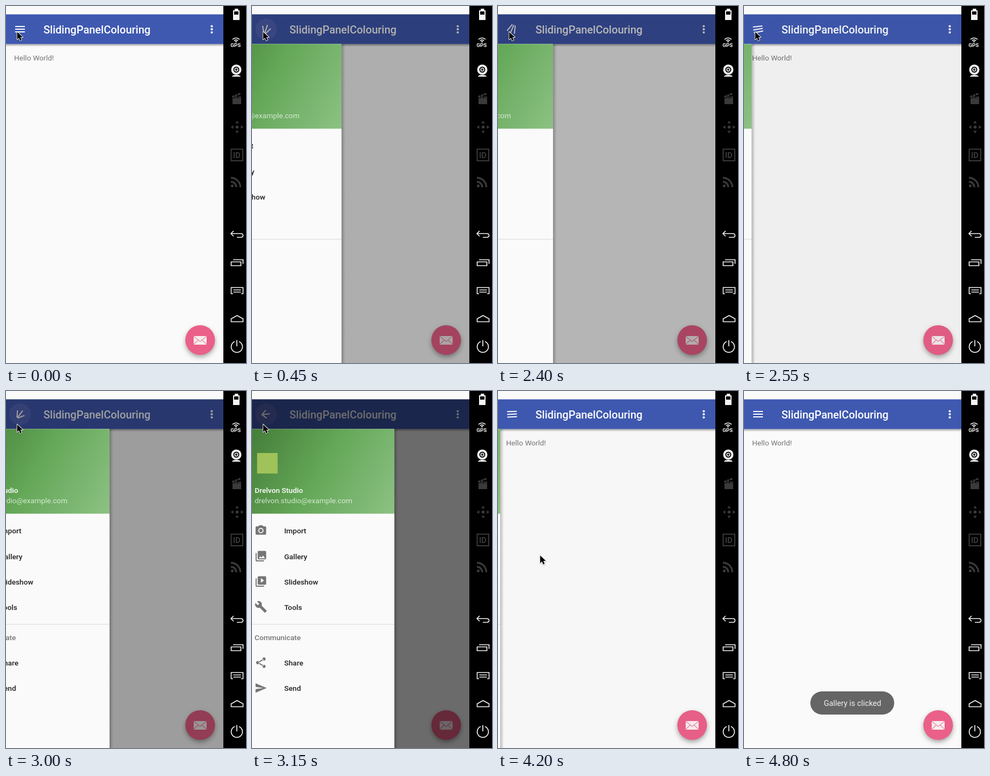
An HTML page with a canvas for the animation above (5250 ms loop, 445 by 662 pixels).

```html
<!DOCTYPE html>
<html lang="en">
<head>
<meta charset="utf-8">
<title>Navigation drawer</title>
<style>
  html, body { margin: 0; width: 100%; height: 100%; overflow: hidden; background: #fafafa; }
  canvas { display: block; width: 445px; height: 662px; }
</style>
</head>
<body>
<canvas id="stage"></canvas>
<script>
const W = 445, H = 662, APP_W = 403, BAR_TOP = 15.5, BAR_BOTTOM = 70.5, DRAWER_W = 274;
const LOOP = 5250, TICK = 150, SLIDE = 557, SCRIM_LAG = 21;
const FONT = 'Roboto, "Open Sans", sans-serif';

const canvas = document.getElementById('stage');
const ctx = canvas.getContext('2d');
const ratio = window.devicePixelRatio || 1;
canvas.width = W * ratio;
canvas.height = H * ratio;

// Drawer moves: [start time, 1 = open / 0 = close]
const MOVES = [[355, 1], [2300, 0], [2880, 1], [3880.4, 0]];
// Pointer stops: [time, x, y]
const POINTER = [[0, 20, 47], [2850, 20, 61], [3300, 49, 236], [3450, 62, 279], [3600, 77.5, 304]];
const POINTER_END = 4350, TOAST_START = 4350;

const ICONS = {
  camera: 'M9 2L7.17 4H4c-1.1 0-2 .9-2 2v12c0 1.1.9 2 2 2h16c1.1 0 2-.9 2-2V6c0-1.1-.9-2-2-2h-3.17L15 2H9z' +
    'm3 15a5 5 0 1 1 0-10 5 5 0 0 1 0 10zM12 8.8a3.2 3.2 0 1 0 0 6.4 3.2 3.2 0 0 0 0-6.4z',
  gallery: 'M22 16V4c0-1.1-.9-2-2-2H8c-1.1 0-2 .9-2 2v12c0 1.1.9 2 2 2h12c1.1 0 2-.9 2-2z' +
    'm-11-4l2.03 2.71L16 11l4 5H8l3-4zM2 6v14c0 1.1.9 2 2 2h14v-2H4V6H2z',
  slides: 'M4 6H2v14c0 1.1.9 2 2 2h14v-2H4V6zM20 2H8c-1.1 0-2 .9-2 2v12c0 1.1.9 2 2 2h12c1.1 0 2-.9 2-2V4' +
    'c0-1.1-.9-2-2-2zm-8 12.5v-9l6 4.5-6 4.5z',
  wrench: 'M22.7 19l-9.1-9.1c.9-2.3.4-5-1.5-6.9-2-2-5-2.4-7.4-1.3L9 6 6 9 1.6 4.7C.4 7.1.9 10.1 2.9 12.1' +
    'c1.9 1.9 4.6 2.4 6.9 1.5l9.1 9.1c.4.4 1 .4 1.4 0l2.3-2.3c.5-.4.5-1.1.1-1.4z',
  share: 'M18 2a3 3 0 1 0 0 6 3 3 0 0 0 0-6zM6 9a3 3 0 1 0 0 6 3 3 0 0 0 0-6zM18 16.1a2.9 2.9 0 1 0 0 5.8 ' +
    '2.9 2.9 0 0 0 0-5.8zM7.5 10.1L16 5.2l1 1.7-8.5 5zM8.5 12.1l8.5 5-1 1.7-8.5-5z',
  send: 'M2 21L23 12 2 3v7l15 2-15 2z'
};

const MENU = [
  ['camera', 'Import', 259], ['gallery', 'Gallery', 306.5], ['slides', 'Slideshow', 353.5],
  ['wrench', 'Tools', 400.5], ['share', 'Share', 504], ['send', 'Send', 551]
];

const lerp = (a, b, p) => a + (b - a) * p;

function rect(x, y, w, h, color) {
  ctx.fillStyle = color;
  ctx.fillRect(x, y, w, h);
}

function disc(x, y, r, color) {
  ctx.fillStyle = color;
  ctx.beginPath();
  ctx.arc(x, y, r, 0, 7);
  ctx.fill();
}

function text(str, x, y, size, color, weight = 400) {
  ctx.font = `${weight} ${size}px ${FONT}`;
  ctx.fillStyle = color;
  ctx.fillText(str, x, y);
}

function stroke(d, color, width) {
  ctx.strokeStyle = color;
  ctx.lineWidth = width;
  ctx.stroke(new Path2D(d));
}

function fill(d, color) {
  ctx.fillStyle = color;
  ctx.fill(new Path2D(d));
}

function fade(x0, y0, x1, y1, ...stops) {
  const g = ctx.createLinearGradient(x0, y0, x1, y1);
  stops.forEach((c, i) => g.addColorStop(i / (stops.length - 1), c));
  return g;
}

// Quintic ease-out of the latest move
function drawerAt(t) {
  let open = 0, target = 0, since = Infinity;
  for (const [start, to] of MOVES) {
    if (t <= start) break;
    const left = (1 - Math.min(1, (t - start) / SLIDE)) ** 5;
    open = to ? 1 - left : left;
    target = to;
    since = t - start;
  }
  return { open, target, since };
}

// Three bars that spin into a back arrow
function drawToggle(p, target) {
  const turn = (target ? -1 : 1) * Math.PI * (1 - p);
  const head = lerp(18, 11.3, p), shaft = lerp(18, 16, p), cut = Math.round(0.7 * p);
  const angle = Math.PI / 4 * p, dx = head * Math.cos(angle), dy = head * Math.sin(angle);
  const gap = lerp(5, -0.7, p), left = -shaft / 2;
  ctx.save();
  ctx.translate(26, 43);
  ctx.rotate(turn);
  ctx.strokeStyle = '#fff';
  ctx.lineWidth = 2;
  ctx.beginPath();
  ctx.moveTo(left + cut, 0);
  ctx.lineTo(-left - cut, 0);
  for (const s of [1, -1]) {
    ctx.moveTo(left, s * gap);
    ctx.lineTo(left + dx, s * (gap + dy));
  }
  ctx.stroke();
  ctx.restore();
}

function drawFab() {
  ctx.save();
  ctx.shadowColor = 'rgba(0,0,0,.34)';
  ctx.shadowBlur = 8 * ratio;
  ctx.shadowOffsetY = 4 * ratio;
  disc(360, 619.5, 27.5, '#ea6088');
  ctx.restore();
  rect(348, 612, 24, 16, '#f8ecef');
  stroke('M348 612.5L360 622 372 612.5M348 627.5L356.5 619.5M372 627.5L363.5 619.5', '#e58aa3', 1.2);
}

function drawApp(drawer) {
  rect(0, 0, APP_W, H, '#fafafa');
  text('Hello World!', 15, 101, 13.7, '#757575');
  rect(0, BAR_BOTTOM, APP_W, 5, fade(0, BAR_BOTTOM, 0, BAR_BOTTOM + 5, 'rgba(0,0,0,.34)', 'rgba(0,0,0,0)'));
  rect(0, BAR_TOP, APP_W, BAR_BOTTOM - BAR_TOP, '#3f59b1');
  if (drawer.target && drawer.since < 400) disc(26, 43, 20, 'rgba(255,200,255,.1)');
  drawToggle(drawer.open, drawer.target);
  text('SlidingPanelColouring', 69.5, 51, 20, '#fff', 500);
  for (const y of [37.5, 43.2, 49]) disc(381.5, y, 2.1, '#fff');
  drawFab();
}

function drawDrawer(edge) {
  ctx.save();
  ctx.beginPath();
  ctx.rect(0, BAR_BOTTOM, APP_W, H);
  ctx.clip();
  ctx.translate(edge - DRAWER_W, 0);
  rect(DRAWER_W, 70, 7, H, fade(DRAWER_W, 0, DRAWER_W + 7, 0, 'rgba(0,0,0,.24)', 'rgba(0,0,0,0)'));
  rect(0, 70, DRAWER_W, H, '#fafafa');
  rect(0, 70, DRAWER_W, 157.5, fade(0, 70, DRAWER_W, 228, '#437b37', '#64a858', '#8dc184'));
  rect(19.5, 115, 38, 38, '#a0c25a');
  text('Drelvon Studio', 15, 189, 13.7, '#fff', 500);
  text('drelvon.studio@example.com', 15, 208, 13.7, 'rgba(255,255,255,.72)');
  for (const [icon, label, y] of MENU) {
    ctx.save();
    ctx.translate(14.7, y - 12);
    ctx.scale(0.98, 0.98);
    ctx.fillStyle = '#757575';
    ctx.fill(new Path2D(ICONS[icon]), 'nonzero');
    ctx.restore();
    text(label, 69.7, y + 5, 13.7, '#212121', 500);
  }
  rect(0, 432, DRAWER_W, 1, '#d9d9d9');
  text('Communicate', 14.7, 462, 13.7, '#757575', 500);
  ctx.restore();
}

function drawToast() {
  ctx.fillStyle = '#656565';
  ctx.beginPath();
  ctx.roundRect(123, 557, 155.5, 43, 21.5);
  ctx.fill();
  text('Gallery is clicked', 148, 584, 14.3, '#f0f0f0');
}

function drawSidebar() {
  const white = '#f4f4f4', grey = '#3a3a3a';
  rect(APP_W, 0, W - APP_W, H, '#000');
  // battery
  rect(424, 5, 6.5, 4, white);
  rect(421, 8, 12, 18, white);
  rect(423, 10, 8, 6, '#000');
  // location
  stroke('M420 62A9 9 0 0 1 433 62M422.8 64.5A5 5 0 0 1 430.2 64.5', white, 1.6);
  disc(426.5, 66, 1.5, white);
  text('GPS', 416.3, 76, 9.8, white, 700);
  // webcam
  disc(427, 118, 9.5, white);
  disc(427, 118, 5.5, '#000');
  disc(427, 118, 3.6, white);
  disc(427, 118, 2, '#000');
  fill('M419 131Q420 127.5 427 128 434 127.5 435 131Z', white);
  // clapper board
  rect(420, 171, 16, 11, grey);
  fill('M419 167L434 161 435 164 420 170Z', grey);
  rect(420, 168, 16, 2.4, grey);
  stroke('M423 164L425 168M428 162L430 166M424 168L422 171M430 168L428 171', '#000', 1.2);
  // four-way move
  disc(428.5, 224.5, 2.8, grey);
  for (let i = 0; i < 4; i++) {
    ctx.save();
    ctx.translate(428.5, 224.5);
    ctx.rotate(i * Math.PI / 2);
    fill('M-3.2 -7L0 -11.8 3.2 -7Z', grey);
    ctx.restore();
  }
  // id card
  stroke('M417.5 265.5H439V287H417.5Z', grey, 2);
  text('ID', 421, 281.5, 14.5, grey, 700);
  // feed
  disc(419.5, 333.5, 2.6, grey);
  stroke('M417 326A10 10 0 0 1 427 336M417 318.5A17.5 17.5 0 0 1 434.5 336', grey, 3.4);
  // back
  stroke('M422 417L417 422 422 427M417 422H435Q439.5 422 439.5 425.5T435 429H428', white, 1.6);
  // overview
  stroke('M417.5 474.5H435.5V481.5H417.5ZM421 470.5H439.5V478', white, 1.7);
  // menu
  stroke('M421 533.5H417.5V522H439.5V533.5H436M421.5 526.5H435.5M421.5 530.5H435.5', white, 1.6);
  // home
  stroke('M417.5 585.5V580L428.5 574 439.5 580V585.5Z', white, 1.6);
  // power
  stroke('M424 622.3A10.4 10.4 0 1 0 432 622.3M428 619.5V631', white, 1.7);
}

function drawPointer(t) {
  if (t >= POINTER_END) return;
  const [, x, y] = POINTER.filter(p => p[0] <= t).pop();
  ctx.save();
  ctx.translate(x, y);
  const arrow = 'M.7 .9V15.2L4 12 6.3 17.4 9 16.2 6.7 11H11.2Z';
  ctx.lineJoin = 'round';
  ctx.shadowColor = 'rgba(0,0,0,.3)';
  ctx.shadowBlur = 2 * ratio;
  ctx.shadowOffsetY = ratio;
  stroke(arrow, '#fff', 1.8);
  ctx.shadowColor = 'transparent';
  fill(arrow, '#000');
  ctx.restore();
}

function draw(t) {
  const drawer = drawerAt(t);
  const edge = Math.round(drawer.open * DRAWER_W - 0.1);
  const scrim = 0.6 * drawerAt(t - SCRIM_LAG).open;
  ctx.setTransform(ratio, 0, 0, ratio, 0, 0);
  drawApp(drawer);
  rect(0, BAR_TOP, APP_W, H, `rgba(0,0,0,${scrim.toFixed(4)})`);
  if (edge > 0) drawDrawer(edge);
  if (t >= TOAST_START) drawToast();
  drawSidebar();
  drawPointer(t);
}

// The screen is refreshed in fixed ticks
const begin = performance.now();
function loop() {
  const t = (performance.now() - begin) % LOOP;
  draw(Math.floor(t / TICK) * TICK);
  requestAnimationFrame(loop);
}
loop();
</script>
</body>
</html>
```
